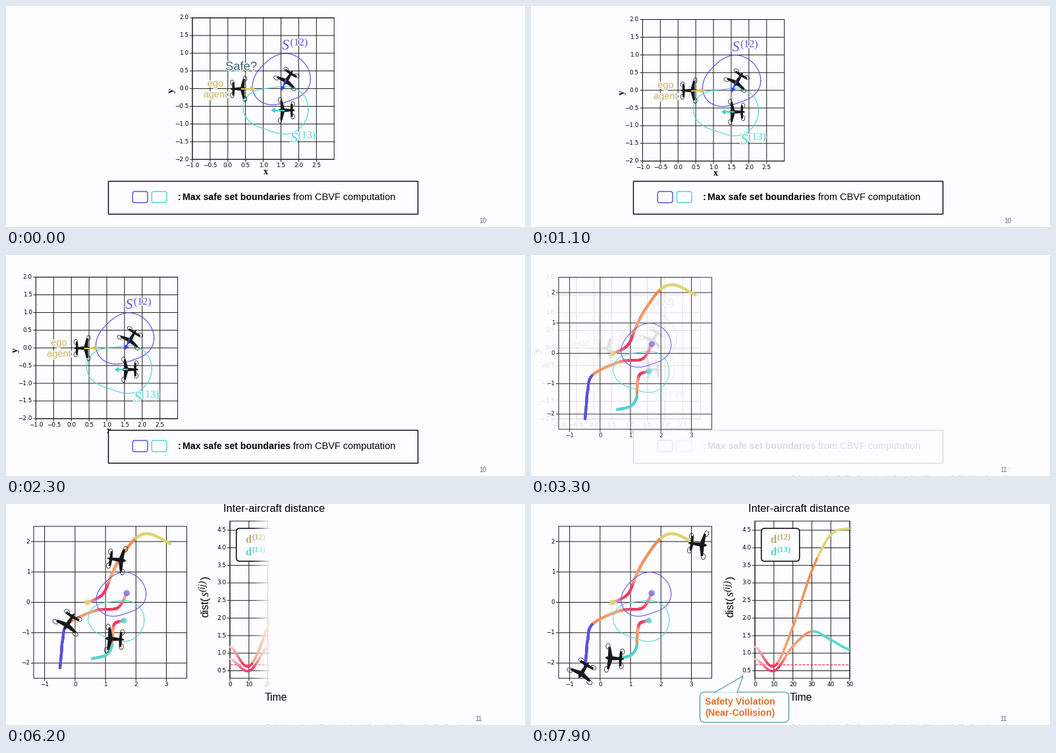
A matplotlib script for the animation above (8000 ms loop, 788 by 336 pixels).

```python
import numpy as np
import matplotlib.pyplot as plt
from matplotlib.animation import FuncAnimation
from matplotlib.collections import LineCollection
from matplotlib.colors import to_rgb
from matplotlib.lines import Line2D
from matplotlib.patches import Ellipse, FancyBboxPatch, Polygon, Rectangle
from matplotlib.patheffects import withStroke

W, H, DPI = 788, 336, 64
PT = 72 / DPI  # points per pixel
STEP, FRAMES = 100, 80

PAPER, INK, GRID = "#fdfcfe", "#000000", "#1c1c1c"
BLUE, CYAN, YELLOW = "#5a52e0", "#50d6cf", "#dcd572"
TAN, TEAL, ORANGE, RED = "#c9b45f", "#2f6675", "#f28a4e", "#ec3a64"
PALE, PEACH, GRAY = "#f8d6cc", "#f4a57c", "#6a6a6a"
SANS, SERIF, PLOT = "Liberation Sans", "Liberation Serif", "DejaVu Sans"

fig = plt.figure(figsize=(W / DPI, H / DPI), dpi=DPI, facecolor=PAPER)
ax = fig.add_axes([0, 0, 1, 1])
ax.set(xlim=(0, W), ylim=(H, 0))
ax.set_autoscale_on(False)
ax.axis("off")
shown = []


# ---------- drawing helpers (pixel coordinates, y down) ----------

def keep(artist):
    artist.set_zorder(len(shown) + 1)
    shown.append(artist)
    return artist


def add(artist):
    return keep(ax.add_artist(artist))


def fade(first, alpha):
    """Scale the opacity of everything drawn since index first."""
    for artist in shown[first:]:
        own = artist.get_alpha()
        artist.set_alpha(alpha * (1 if own is None else own))


def line(xs, ys, color=INK, width=1.0, **kw):
    add(Line2D(xs, ys, color=color, lw=width * PT, **kw))


def label(x, y, text, size, color=INK, font=SANS, ha="left", va="baseline",
          bold=False, italic=False, angle=0, glow=False):
    item = keep(ax.text(x, y, text, fontsize=size * PT, color=color, family=font,
                        ha=ha, va=va, rotation=angle, rotation_mode="anchor",
                        weight="bold" if bold else "normal",
                        style="italic" if italic else "normal"))
    if glow:
        item.set_path_effects([withStroke(linewidth=3 * PT, foreground=PAPER)])


def shape(points, fill):
    add(Polygon(points, closed=True, fc=fill, ec="none"))


def dot(x, y, radius, color, alpha):
    add(Ellipse((x, y), 2 * radius, 2 * radius, fc=color, ec="none", alpha=alpha))


def round_box(x, y, width, height, radius, edge, line_width, fill=PAPER):
    style = f"round,pad=0,rounding_size={radius}"
    add(FancyBboxPatch((x, y), width, height, boxstyle=style,
                       fc=fill, ec=edge, lw=line_width * PT))


def power(x, y, base, exponent, color, size, small, gap, rise, **kw):
    label(x, y, base, size, color, SERIF, **kw)
    kw["italic"] = False
    label(x + gap, y - rise, exponent, small, color, SERIF, **kw)


def spline(points, n=16):
    """Catmull-Rom curve through key points that are equally spaced in time."""
    p = np.array(points, float)
    p = np.vstack([p[0], p, p[-1]])
    u = np.linspace(0, 1, n, endpoint=False)[:, None]
    parts = [0.5 * (2 * b + (c - a) * u + (2 * a - 5 * b + 4 * c - d) * u**2
                    + (3 * b - a - 3 * c + d) * u**3)
             for a, b, c, d in zip(p, p[1:], p[2:], p[3:])]
    return np.vstack(parts + [p[-2]])


def at(path, f):
    steps = np.linspace(0, 1, len(path))
    return np.array([np.interp(f, steps, column) for column in path.T])


def blob(center, *waves):
    """Closed curve whose radius is a sum of (order, size, phase in degrees) waves."""
    angle = np.linspace(0, 2 * np.pi, 121)
    r = sum(size * np.cos(k * (angle - np.radians(phase))) for k, size, phase in waves)
    return center[0] + r * np.cos(angle), center[1] + r * np.sin(angle)


def danger_colors(u, peak, calm, switch, own):
    """Pale, then red at the peak, orange from calm on, own colour after switch."""
    stops = [0, peak - .05, peak + .05, calm, switch]
    rgb = np.array([to_rgb(c) for c in (PALE, RED, RED, PEACH, ORANGE)])
    mixed = np.column_stack([np.interp(u, stops, rgb[:, k]) for k in range(3)])
    return np.where(u[:, None] > switch, to_rgb(own), mixed)


def color_line(path, colors, width, cap):
    pieces = np.stack([path[:-1], path[1:]], axis=1)
    add(LineCollection(pieces, colors=colors, linewidths=width * PT, capstyle=cap))


def number(value, digits):
    return f"{value:.{digits}f}".replace("-", "\u2212")


def chart(box, xlim, ylim, xticks, yticks, digits):
    """Grid, frame and tick labels; returns the data-to-pixel mapping."""
    left, top, width, height = box
    right, bottom = left + width, top + height

    def to_px(x, y):
        return (left + (x - xlim[0]) / (xlim[1] - xlim[0]) * width,
                bottom - (y - ylim[0]) / (ylim[1] - ylim[0]) * height)

    for value in xticks:
        x = to_px(value, 0)[0]
        line([x, x], [top, bottom + 3.5], GRID, snap=False)
        label(x, bottom + 9.7, number(value, digits[0]), 8.9, font=PLOT,
              ha="center", va="center")
    for value in yticks:
        y = to_px(0, value)[1]
        line([left - 3.5, right], [y, y], GRID, snap=False)
        label(left - 5.8, y, number(value, digits[1]), 8.9, font=PLOT,
              ha="right", va="center")
    add(Rectangle((left, top), width, height, fc="none", ec=GRID, lw=PT, snap=False))
    return to_px


def mirrored(half):
    return half + [(x, -y) for x, y in reversed(half)]


def drone(x, y, heading, size=1.0):
    a = np.radians(heading)
    turn = size * np.array([[np.cos(a), np.sin(a)], [-np.sin(a), np.cos(a)]])

    def place(points):
        return np.array(points, float) @ turn + (x, y)

    for center in place(mirrored([(9, 15.5), (-10.5, 9.5)])):
        add(Ellipse(center, 5.4 * size, 7.6 * size, angle=heading, fc="none",
                    ec="#222222", lw=0.8 * PT))
    wing = [(8, 0), (8.5, 15), (5.5, 15), (2, 2)]
    tail = [(-6.5, 0), (-7.5, 10), (-10.5, 10), (-10.5, 0)]
    body = [(12, 0), (9, 2), (0, 2.5), (-13, 1)]
    for part in (wing, tail, body):
        shape(place(mirrored(part)), "#17181a")


def arrow(x, y, dx, dy, color):
    tip = np.array([x + dx, y + dy])
    unit = np.array([dx, dy]) / np.hypot(dx, dy)
    neck = tip - 7 * unit
    side = 4 * unit[::-1] * (-1, 1)
    line([x, neck[0]], [y, neck[1]], color, 2.2)
    shape([tip, neck + side, neck - side], color)


# ---------- timing ----------

def progress(t, start, end):
    return min(max((t - start) / (end - start), 0), 1)


def smooth(u):
    return u * u * (3 - 2 * u)


def glide(u, brake=0.7):
    """Constant speed, slowing to a stop after the brake point."""
    if u < brake:
        return 2 * u / (1 + brake)
    return 1 - (1 - u)**2 / (1 - brake**2)


# ---------- curves ----------

SAFE_SETS = [
    (BLUE, blob((1.55, .27), (0, .75, 0), (1, .035, -150), (2, .09, 27), (3, .04, -25))),
    (CYAN, blob((1.35, -.6), (0, .78, 0), (1, .04, 20), (2, .14, -5), (3, .04, 171))),
]

# key points, drone heading, colour rule
TRACKS = [
    (spline([(124, 150), (147, 137), (160, 108), (172, 85), (196, 53),
             (218, 45.5), (249, 60.5)]), 8, (.19, .3, .68, YELLOW)),
    (spline([(183, 136), (169, 158), (136, 162), (94, 182), (86, 207),
             (84, 228), (82, 249)]), 122, (.22, .36, .51, BLUE)),
    (spline([(179, 177), (166, 181), (162, 192), (161, 205), (160, 218),
             (151, 230), (131, 235)]), 184, (.18, .34, .62, CYAN)),
]

# distance every ten time steps, colour rule
DISTANCES = [
    (spline(np.c_[[1.2, .62, 1.75, 3.35, 4.37, 4.55]]), (.18, .22, .67, YELLOW)),
    (spline(np.c_[[.85, .49, 1.2, 1.62, 1.38, 1.1]]), (.2, .33, .6, CYAN)),
]


def safe_sets(to_px, width):
    for color, (x, y) in SAFE_SETS:
        line(*to_px(x, y), color, width)


# ---------- scenes ----------

def panel_place(t):
    if t < 100:
        return 283, 18
    s = glide(progress(t, 100, 2500))
    return 292 - 250 * s, 7.6 + 26.4 * s


def set_panel(x, y, ask):
    ticks = np.arange(-2, 2.6, .5)
    to_px = chart((x, y, 215.2, 215.2), (-1, 3), (-2, 2), ticks[2:], ticks[:-1], (1, 1))
    label(x + 111, y + 237.5, "x", 14, font=SERIF, ha="center", bold=True)
    label(x - 28, y + 111, "y", 14, font=SERIF, ha="center", bold=True, angle=90)
    safe_sets(to_px, 1.2)
    drone(x + 71, y + 108, 0)
    drone(x + 145, y + 92, 122)
    drone(x + 142, y + 140.5, 180)
    arrow(x + 75, y + 108, 20, 0, "#e0c45c")
    arrow(x + 142, y + 94, -7, 17, "#4a40f0")
    arrow(x + 139, y + 140.5, -20, 0, "#3fd0c8")
    power(x + 136, y + 48, "S", "(12)", BLUE, 22, 16, 12.5, 6, italic=True, glow=True)
    power(x + 149, y + 189, "S", "(13)", CYAN, 22, 16, 11.5, 6, italic=True, glow=True)
    label(x + 35, y + 104, "ego", 14.6, TAN, ha="center", glow=True)
    label(x + 35, y + 121, "agent", 14.6, TAN, ha="center", glow=True)
    if ask:
        label(x + 74, y + 79.5, "Safe?", 18.4, TEAL, ha="center", glow=True)


def first_slide(t):
    set_panel(*panel_place(t), ask=t < 100)
    add(Rectangle((155.3, 266.3), 470, 49.3, fc=PAPER, ec=INK, lw=1.4 * PT))
    for x, color in ((192.3, BLUE), (221.3, CYAN)):
        round_box(x, 282, 22.7, 17, 3, color, 1.5)
    label(261, 295, ":", 14.2, bold=True)
    label(268, 295, "Max safe set boundaries", 14.1, bold=True)
    label(436, 295, "from CBVF computation", 14.5)
    label(723.5, 330.5, "10", 10, GRAY, ha="center")


def track_panel():
    to_px = chart((42, 34, 232.5, 231), (-1.36, 3.67), (-2.5, 2.5),
                  range(-1, 4), range(-2, 3), (0, 0))
    for path, _, rule in TRACKS:
        u = np.linspace(0, 1, len(path) - 1)
        color_line(path, danger_colors(u, *rule), 4, "projecting")
    dot(123.5, 149.7, 4.6, YELLOW, .8)
    dot(183.2, 135.6, 4.8, BLUE, .65)
    dot(179, 177.2, 4.6, CYAN, .75)
    safe_sets(to_px, 1.1)


def wipe(left, right, top, bottom, edge, soft=28):
    """Cover everything right of a soft edge."""
    columns = np.arange(left, right)
    veil = np.ones((1, len(columns), 4))
    veil[..., :3] = to_rgb(PAPER)
    veil[0, :, 3] = np.clip((columns - edge + soft) / soft, 0, 1)
    keep(ax.imshow(veil, extent=(left, right, bottom, top), aspect="auto",
                   interpolation="nearest"))


def distance_panel(t):
    to_px = chart((340, 26, 144, 239), (0, 50), (.285, 4.76),
                  range(0, 51, 10), np.arange(.5, 4.6, .5), (0, 1))
    line([340, 484], [244.3, 244.3], RED, 1.3, dashes=(3.2, 1.4))
    time = np.arange(51)
    for values, rule in DISTANCES:
        path = np.column_stack(to_px(time, at(values, time / 50)[0]))
        color_line(path, danger_colors(time[:-1] / 49, *rule), 3.8, "butt")
    round_box(349.7, 37, 58, 50, 5, INK, 1.5)
    power(363.5, 59, "d", "(12)", "#bcab6c", 16.5, 12.6, 9.6, 5, bold=True)
    power(363.5, 78.5, "d", "(13)", CYAN, 16.5, 12.6, 9.6, 5, bold=True)
    wipe(317, 496, 20, 284, 314 + 206 * progress(t, 5300, 7400))

    label(407.5, 12.5, "Inter-aircraft distance", 16.4, ha="center")
    label(410, 299, "Time", 15.7, ha="center")
    label(307.5, 172, "dist(", 16.4, angle=90)
    label(307.5, 140.5, "s", 18, font=SERIF, italic=True, angle=90)
    label(302, 133, "(ij)", 14.5, font=SERIF, italic=True, angle=90)
    label(307.5, 115, ")", 16.4, angle=90)


def callout():
    edge = "#2f7f90"
    pointer = [(279, 286.5), (322, 261.5), (313, 286.5)]
    round_box(256.5, 286, 135, 46, 7, edge, 1, "#ffffff")
    shape(pointer, "#ffffff")
    line(*zip(*pointer), edge, 1)
    label(264, 304.5, "Safety Violation", 14.2, "#e0702c", bold=True)
    label(264, 322, "(Near-Collision)", 14.2, "#e0702c", bold=True)


def second_slide(t):
    label(396, 335, "Safe sets are found offline for each pair of aircraft and then "
          "used to filter the actions online", 8.4, "#b0b0b0", va="top")
    label(718, 330.5, "11", 10, GRAY, ha="center")
    track_panel()
    if t >= 5200:
        distance_panel(t)
    if t >= 4600:
        done = progress(t, 5200, 7200)
        lead = -11 + 16 * done  # from behind the track's start to just past its end
        for path, heading, _ in TRACKS:
            a = np.radians(heading)
            x, y = at(path, done) + lead * np.array([np.cos(a), np.sin(a)])
            drone(x, y, heading, 1.14)
    if t > 7400:
        first = len(shown)
        callout()
        fade(first, progress(t, 7400, 7900))


def draw(frame):
    for artist in shown:
        artist.remove()
    shown.clear()
    t = frame * STEP
    mix = smooth(progress(t, 2600, 3500))
    if mix < 1:
        first_slide(t)
    if mix > 0:
        add(Rectangle((0, 0), W, H, fc=PAPER, ec="none", alpha=mix))
        first = len(shown)
        second_slide(t)
        if mix < 1:
            fade(first, mix)
    return shown


animation = FuncAnimation(fig, draw, frames=FRAMES, interval=STEP,
                          repeat=True, repeat_delay=0, blit=False)
plt.show()
```
